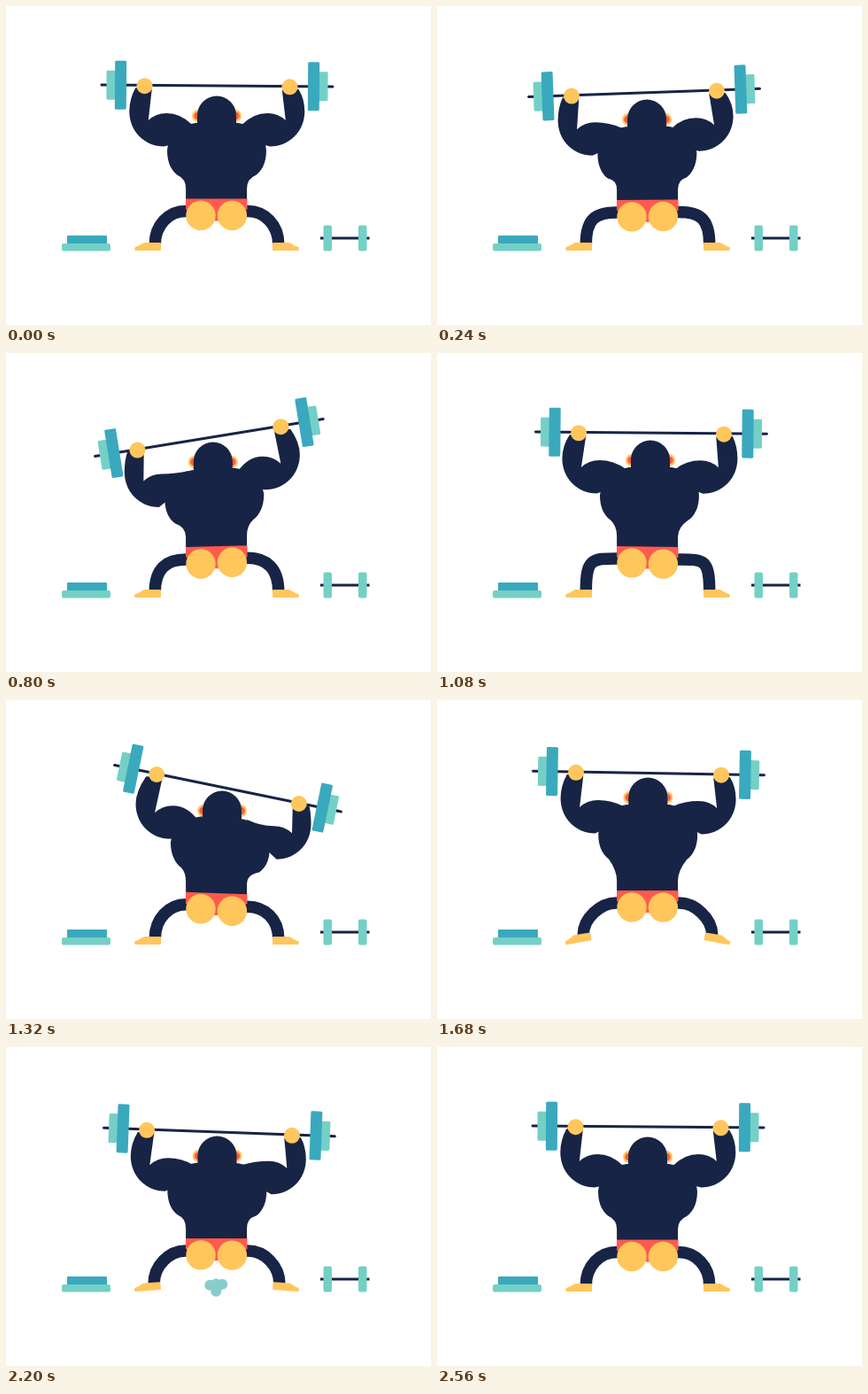
An HTML page with a canvas that plays this animation: 480 px wide and 360 px high, repeating every 2600 ms.

```html
<!DOCTYPE html>
<html lang="en">
<head>
<meta charset="utf-8">
<title>Weightlifter</title>
<style>
  html, body { margin: 0; width: 100%; height: 100%; overflow: hidden; background: #fff; }
  canvas { display: block; }
</style>
</head>
<body>
<canvas id="stage" width="480" height="360"></canvas>
<script>
const ctx = document.getElementById('stage').getContext('2d');
const NAVY = '#172445', TEAL = '#3aa9bd', MINT = '#74d0c6', GOLD = '#ffc65c', RED = '#ff5a4d';
const LOOP = 2600, STEP = 40, CENTER = 238;

// time, bar x, bar y, bar angle, head x, head y, hip y, knee bend, heel lift
const KEYS = [
  [0, 0, 0, 0, 0, 0, 0, 0, 0],
  [480, -10.5, 15.7, -7.1, -3, 8, 2.5, 1, 0],
  [660, -12, 9.7, -11.6, -6, 1, .5, 0, 0],
  [1080, 3.5, .2, .1, 3, -3, 1, 1, 0],
  [1320, 12, 9.7, 11.2, 6, 1, .5, 0, 0],
  [1520, 5, 7, 4, 3, 6, 2, .4, 0],
  [1680, .5, -7.5, .6, .3, -14, -2.5, 0, 1],
  [1760, 0, -11, .3, 0, -16, -3, 0, 1.1],
  [1960, 1, -4, 1, 0, -8, -2, 0, .8],
  [2200, 2.5, 6, 1.7, .5, -1, -1.5, 0, .4],
  [2420, 0, 0, 0, 0, 0, 0, 0, 0],
  [2600, 0, 0, 0, 0, 0, 0, 0, 0]
];

const clamp = v => Math.max(0, Math.min(1, v));

// Monotone cubic through the keys: smooth, without overshoot
function sample(t, c) {
  const slope = i => i < 0 || i > KEYS.length - 2 ? 0
    : (KEYS[i + 1][c] - KEYS[i][c]) / (KEYS[i + 1][0] - KEYS[i][0]);
  const tangent = i => {
    const a = slope(i - 1), b = slope(i);
    return a * b <= 0 ? 0 : 2 * a * b / (a + b);
  };
  let i = 0;
  while (t >= KEYS[i + 1][0]) i++;
  const p = KEYS[i][c], q = KEYS[i + 1][c], d = KEYS[i + 1][0] - KEYS[i][0];
  const u = (t - KEYS[i][0]) / d, v = 1 - u;
  return p * v * v * (1 + 2 * u) + q * u * u * (3 - 2 * u)
    + d * u * v * (tangent(i) * v - tangent(i + 1) * u);
}

function fill(color, path) {
  ctx.fillStyle = color;
  ctx.fill(new Path2D(path));
}
function stroke(color, width, path) {
  ctx.strokeStyle = color;
  ctx.lineWidth = width;
  ctx.stroke(new Path2D(path));
}
function disc(color, x, y, r) {
  ctx.fillStyle = color;
  ctx.beginPath();
  ctx.arc(x, y, r, 0, 7);
  ctx.fill();
}
function box(color, x, y, w, h, r = 1.5) {
  ctx.fillStyle = color;
  ctx.beginPath();
  ctx.roundRect(x, y, w, h, r);
  ctx.fill();
}

function drawProps() {
  box(TEAL, 69, 259, 45, 10, 1);
  box(MINT, 63, 268, 55, 8.5, 2);
  stroke(NAVY, 3, 'M355,262H410.5');
  box(MINT, 358.5, 247.5, 9.5, 29, 2);
  box(MINT, 398, 247.5, 9.5, 29, 2);
}

function drawBar(p) {
  ctx.save();
  ctx.translate(238.5 + p.barX, 90 + p.barY);
  ctx.rotate(p.angle + .007);
  stroke(NAVY, 3, 'M-130.5,0H130.5');
  for (const s of [-1, 1]) {
    box(MINT, s * 119.5 - 5.5, -16.5, 11, 33);
    box(TEAL, s * 109 - 6.5, -27.5, 13, 55);
  }
  ctx.restore();
}

function drawLeg(s, p) {
  const mix = (a, b) => a + (b - a) * p.knee;
  const hip = 231.5 + p.hipY + s * p.headX * .2;
  const ankleX = -69.7 - 3 * p.heel, ankleY = 269 - 4 * p.heel;
  ctx.save();
  ctx.translate(CENTER, 0);
  ctx.scale(-s, 1);
  stroke(NAVY, 13.5, `M-28,${hip}H-35C${mix(-54, -63)},${hip} ${ankleX},${mix(247, 232)} ${ankleX},${ankleY}`);
  ctx.translate(-91, 276);
  ctx.rotate(-.175 * p.heel);
  fill(GOLD, 'M-1,0Q-4,-4 2,-5L9,-9H27Q28,-9 28,-8V-1Q28,0 27,0Z');
  ctx.restore();
}

function drawArm(s, p) {
  const swing = s * 81 * Math.sin(p.angle);
  const at = (dx, dy) => (x, y) => `${CENTER + .3 - s * x + dx},${y + dy} `;
  const hand = at(p.barX, p.barY + swing + s * .7);
  const elbow = at(p.barX * .6, p.barY + swing * .73);
  const chest = at(p.headX, p.headY);
  fill(NAVY, `M${hand(-92, 93)}Q${elbow(-99, 105)}${elbow(-99, 119)}`
    + `C${elbow(-99, 141)}${elbow(-82, 158.5)}${elbow(-60, 158.5)}`
    + `L${chest(-33, 152)}L${chest(-28, 134)}Q${elbow(-41, 121)}${elbow(-57, 121)}`
    + `Q${elbow(-69, 121)}${elbow(-77.5, 129)}L${hand(-73.5, 94)}Z`);
}

function drawTorso(s, p) {
  const tilt = s * Math.sin(p.angle * .3);
  const at = (dx, dy) => (x, y) => `${CENTER - s * x + dx},${y + dy - x * tilt} `;
  const chest = at(p.headX, p.headY);
  const lat = at(p.headX * .65, p.headY * .8);
  const waist = (x, y) => `${237.6 - s * x},${y + p.hipY - s * x * p.headX * .006} `;
  fill(NAVY, `M${chest(3, 132)}L${chest(-24, 132)}Q${chest(-54, 137)}${lat(-56, 163)}`
    + `C${lat(-56, 178)}${lat(-50, 187)}${lat(-44, 191)}`
    + `Q${waist(-34.5, 195)}${waist(-34.5, 206)}L${waist(-34.5, 219)}L${waist(3, 219)}Z`);
}

function drawHead(p) {
  const x = CENTER + p.headX, y = 123.5 + p.headY;
  disc(NAVY, x, y, 22);
  box(NAVY, x - 22, y, 44, 18, 0);
}

function drawShorts(p) {
  const tilt = p.headX * .2, y = 217.5 + p.hipY;
  fill(RED, `M203,${y - tilt}L272.5,${y + tilt}V${y + 12}L240,${y + 25}H236L203,${y + 12}Z`);
  for (const s of [-1, 1]) disc(GOLD, 237.7 + s * 17.7, y + 19 + s * tilt, 16.7);
}

function drawPuff(t) {
  const size = clamp((t - 1960) / 160) * clamp((2440 - t) / 200);
  if (!size) return;
  const fall = 1 - (1 - clamp((t - 1960) / 400)) ** 2;
  ctx.save();
  ctx.translate(237.3, 250 + 26 * fall);
  ctx.scale(size, size);
  for (const [x, y, r] of [[-7, -3, 6], [0, -5, 5.5], [7, -4, 6], [0, 4, 6], [1, -1, 6]])
    disc('#88cdca', x, y, r);
  ctx.restore();
}

function draw(t) {
  const [barX, barY, degrees, headX, headY, hipY, knee, heel] =
    KEYS[0].slice(1).map((_, i) => sample(t, i + 1));
  const p = { barX, barY, angle: degrees * Math.PI / 180, headX, headY, hipY, knee, heel };
  const sides = [-1, 1];

  ctx.fillStyle = '#fff';
  ctx.fillRect(0, 0, 480, 360);
  drawProps();
  drawPuff(t);
  ctx.lineCap = 'round';
  drawBar(p);
  ctx.lineCap = 'butt';
  for (const s of sides) drawLeg(s, p);
  for (const s of sides) {
    const x = CENTER + headX, y = 124 + headY;
    disc(GOLD, x + s * 21, y, 7);
    disc(RED, x + s * 21.5, y, 4.3);
  }
  for (const s of sides) drawTorso(s, p);
  for (const s of sides) drawArm(s, p);
  drawHead(p);
  drawShorts(p);
  for (const s of sides) {
    const a = p.angle + .007;
    disc(GOLD, 238.5 + barX + s * 82 * Math.cos(a), 90.8 + barY + s * 82 * Math.sin(a), 9);
  }
}

function tick() {
  draw(Math.floor(performance.now() % LOOP / STEP) * STEP);
  requestAnimationFrame(tick);
}
tick();
</script>
</body>
</html>
```
